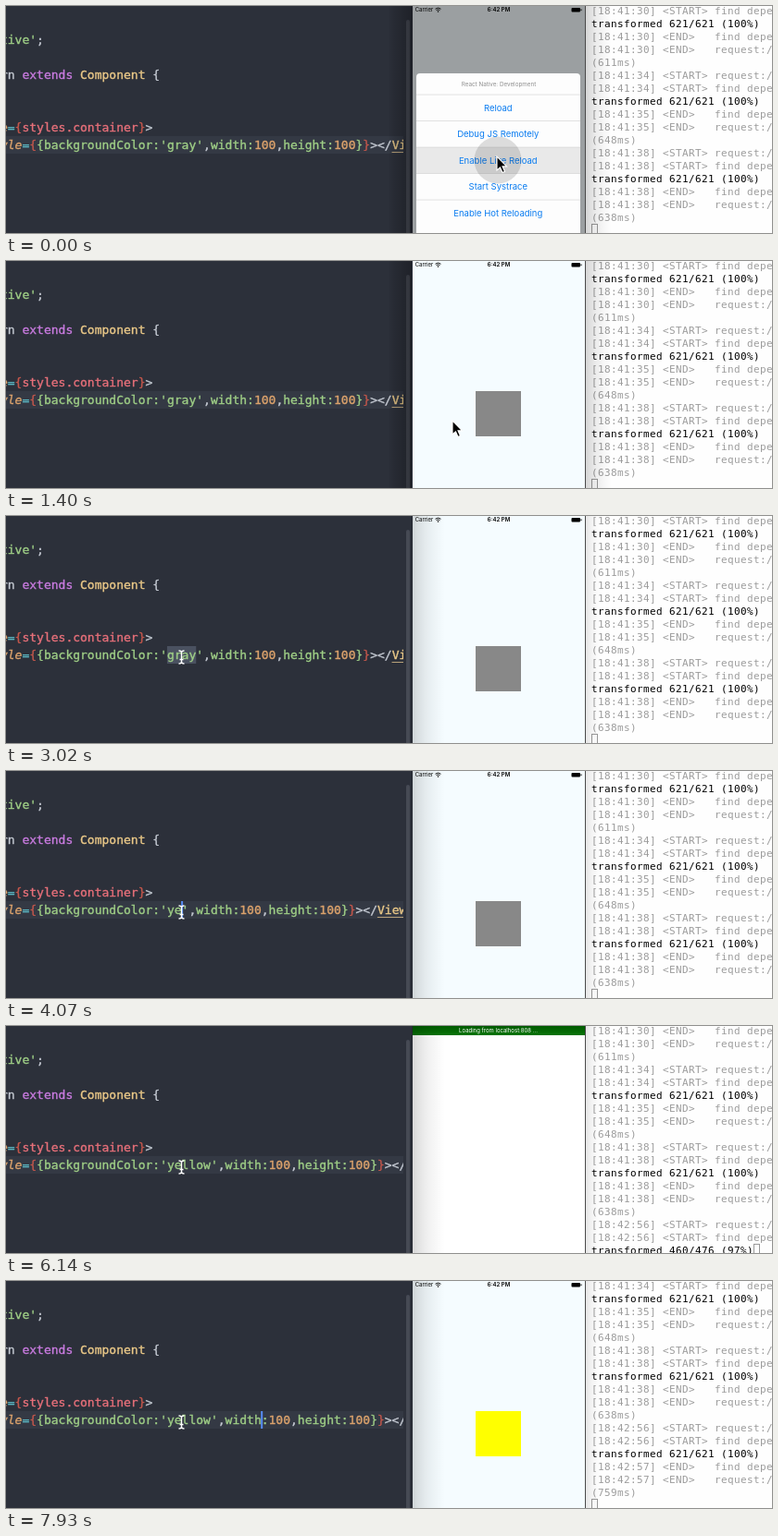
An HTML page that plays this animation: 827x246 px, repeating every 8000 ms.

```html
<!DOCTYPE html>
<html lang="en">
<head>
<meta charset="utf-8">
<title>Live reload</title>
<style>
  html, body { margin: 0; width: 100%; height: 100%; overflow: hidden; background: #fff; }
  svg { display: block; }
  text { white-space: pre; }
  .code { font: 13px "DejaVu Sans Mono", monospace; }
  .code tspan { stroke-width: .35px; }
  .log { font: 11px "DejaVu Sans Mono", monospace; letter-spacing: .378px; }
  .ui { font-family: Inter, "Liberation Sans", sans-serif; text-anchor: middle; }
</style>
</head>
<body>
<svg id="stage" width="827" height="246" viewBox="0 0 827 246">
  <defs>
    <linearGradient id="toLeft">
      <stop offset="0" stop-opacity="0"/><stop offset=".3" stop-opacity=".12"/><stop offset="1" stop-opacity=".3"/>
    </linearGradient>
    <linearGradient id="toRight">
      <stop offset="0" stop-opacity=".16"/><stop offset=".4" stop-opacity=".07"/>
      <stop offset=".75" stop-opacity=".025"/><stop offset="1" stop-opacity="0"/>
    </linearGradient>
    <linearGradient id="bar" x2="0" y2="1">
      <stop offset="0" stop-color="#005a00"/><stop offset="1" stop-color="#087408"/>
    </linearGradient>
  </defs>

  <rect width="439" height="246" fill="#2c303a"/>
  <rect id="activeLine" y="141" width="429" height="19" fill="#343944"/>
  <rect id="selection" y="141" height="19" fill="#4a5160"/>
  <svg id="editor" class="code" width="429" height="246">
    <text id="styleLine" y="155"></text>
    <rect id="underline" y="158" width="31.3" height="1" fill="#b9a27a"/>
  </svg>
  <rect id="caret" y="141" width="2" height="19" fill="#568cf5"/>
  <rect x="432" y="15" width="4" height="240" rx="2" fill="#464a54"/>

  <rect x="626" width="201" height="246" fill="#fefefe"/>
  <g id="log" class="log"></g>
  <rect id="block" y="236.5" width="6" height="12" fill="none" stroke="#999"/>

  <rect id="editorShade" x="412" width="26" height="246" fill="url(#toLeft)"/>
  <rect id="logShade" x="626" height="246" fill="url(#toRight)"/>

  <svg x="438" width="188" height="246" viewBox="438 0 188 246">
    <rect id="screen" x="439" width="187" height="246"/>
    <rect id="box" x="507" y="141" width="49" height="49"/>
    <g id="status" class="ui" font-size="6">
      <text x="451.5" y="6.3">Carrier</text>
      <text x="532" y="6.3" font-weight="600">6:42 PM</text>
      <path d="M463.5 3.2Q466.5 .8 469.5 3.2M464.6 4.6Q466.5 3 468.4 4.6" fill="none" stroke="#000" stroke-width=".9"/>
      <circle cx="466.5" cy="6" r=".8"/>
      <rect x="610.5" y="2" width="9.5" height="4.6" rx="1"/>
      <rect x="620.5" y="3.4" width="1" height="1.8"/>
    </g>
    <g id="loading" class="ui">
      <rect x="439" width="187" height="10" fill="url(#bar)"/>
      <text x="531.5" y="7" font-size="6" fill="#fff">Loading from localhost:808 ...</text>
    </g>
    <rect id="dim" x="438" width="188" height="246"/>
    <g id="sheet" class="ui">
      <rect x="443" y="73" width="177" height="200" rx="4" fill="#fdfdfd"/>
      <text x="532" y="87.3" font-size="6.3" fill="#8f8f8f">React Native: Development</text>
    </g>
    <rect id="simShade" x="438" width="36" height="246" fill="url(#toRight)"/>
    <rect x="625" width="1" height="246" fill="#4a4a4a"/>
  </svg>

  <circle id="touch" cx="531" cy="167" r="25.5" fill-opacity=".13"/>
  <path id="arrow" d="M0 0V15L3.5 11.8L6 17.5L8.5 16.4L6 10.9H10.6Z" stroke="#fff" stroke-width="1.1"/>
  <path id="beam" d="M-3-7Q0-7 0-5V5Q0 7-3 7M3-7Q0-7 0-5M3 7Q0 7 0 5M-2 2.5H2" fill="none" stroke="#fff" stroke-width="1.4"/>
</svg>

<script>
const LOOP = 8000, CELL = 7.826, LEFT = 1.77;
const $ = id => document.getElementById(id);
const set = (id, attrs) => { for (const k in attrs) $(id).setAttribute(k, attrs[k]); };
const show = (id, on) => { $(id).style.display = on ? '' : 'none'; };
const esc = s => s.replace(/</g, '&lt;');
const col = n => LEFT + n * CELL;

// Last entry whose time has been reached.
const at = (steps, t) => steps.reduce((cur, s) => s[0] <= t ? s : cur);

const C = { text: '#c5cad3', green: '#9fcf86', purple: '#c97be0', yellow: '#ebc988',
            red: '#e8707a', brace: '#c4574c', cyan: '#5cbac6', orange: '#dba26c' };

const spans = parts => parts.map(([color, s, extra = '']) =>
  `<tspan fill="${C[color]}" stroke="${C[color]}" ${extra}>${esc(s)}</tspan>`).join('');

function addCode(y, parts) {
  $('editor').insertAdjacentHTML('beforeend', `<text x="${col(-1)}" y="${y}">${spans(parts)}</text>`);
}
addCode(41, [['green', "tive'"], ['text', ';']]);
addCode(79, [['text', 'rn '], ['purple', 'extends '], ['yellow', 'Component '], ['text', '{']]);
addCode(136, [['orange', 'e', 'font-style="italic"'], ['cyan', '='], ['brace', '{'],
              ['red', 'styles.container'], ['brace', '}'], ['text', '>']]);

const styleParts = word => [
  ['orange', 'yle', 'font-style="italic"'], ['cyan', '='], ['brace', '{'], ['green', '{'],
  ['green', `backgroundColor:'${word}'`], ['text', ','],
  ['green', 'width:'], ['orange', '100'], ['text', ','],
  ['green', 'height:'], ['orange', '100'], ['green', '}'], ['brace', '}'],
  ['text', '></'], ['yellow', 'View']];
set('styleLine', { x: col(-1) });

const rows = ['Reload', 'Debug JS Remotely', 'Enable Live Reload', 'Start Systrace', 'Enable Hot Reloading'];
$('sheet').insertAdjacentHTML('beforeend', rows.map((label, i) => {
  const y = 96 + i * 28.5;
  return `<rect x="443" y="${y}" width="177" height="28.5" fill="${i === 2 ? '#e9e9e9' : 'none'}"/>
    <rect x="443" y="${y - .25}" width="177" height=".6" fill="#cfcfcf"/>
    <text x="531.3" y="${y + 17.6}" font-size="9.5" fill="#0a7cf0">${label}</text>`;
}).join(''));

const build = (start, end, ms) => [
  `[${start}] <START> request:/`, `[${start}] <START> find depe`,
  'transformed 621/621 (100%)',
  `[${end}] <END>   find depe`, `[${end}] <END>   request:/`, `(${ms}ms)`];
const log = [
  ...build('18:41:30', '18:41:30', 611), ...build('18:41:34', '18:41:35', 648),
  ...build('18:41:38', '18:41:38', 638), ...build('18:42:56', '18:42:57', 759)].slice(1);

const words = [[0, 'gray'], [3920, 'y'], [4070, 'ye'], [4510, 'yel'], [4660, 'yell'], [4810, 'yello'], [4960, 'yellow']];
const carets = [[0, -1], [1840, 46], [2280, -1], [2430, 24], [2570, -1],
  [3920, 23], [4070, 24], [4510, 25], [4660, 26], [4810, 27], [4960, 28],
  [5410, -1], [5700, 28], [6140, -1], [6590, 28], [7040, 29],
  [7490, 30], [7640, 31], [7780, 33], [7930, 35]];
const pointer = [[0, 530, 163], [1400, 482, 173], [1550, 392, 178], [1700, 292, 181],
  [1840, 236, 181], [1980, 225, 180], [2130, 214, 172], [2280, 191, 154, 'beam'], [2430, 189.5, 153, 'beam']];
const sheet = [[0, 0, .37], [500, 95, .18], [640, 200, 0]];
const app = [[0, '#f5fcff', '#888'], [5700, '#fff', 'none', 'bar'],
  [6440, '#f5fcff', '#ff0', 'bar'], [6590, '#f5fcff', '#ff0']];
const output = [[0, 17, ''], [5550, 18, ''], [5700, 19, 'transformed 67/118 (57%)'],
  [5850, 19, 'transformed 215/260 (83%)'], [5990, 19, 'transformed 371/392 (95%)'],
  [6140, 19, 'transformed 460/476 (97%)'], [6290, 19, 'transformed 588/598 (98%)'], [6440, 23, '']];

let lastWord, lastOutput;

function drawEditor(t) {
  const [, word] = at(words, t), [, caret] = at(carets, t);
  if (word !== lastWord) {
    $('styleLine').innerHTML = spans(styleParts(word));
    set('underline', { x: col(49 + word.length) });
    lastWord = word;
  }
  const selected = t >= 2870 && t < 3920;
  show('selection', selected);
  set('selection', { x: col(22), width: 4 * CELL });
  show('activeLine', !selected);
  show('caret', caret >= 0);
  set('caret', { x: col(caret) - .5 });
}

function drawLog(t) {
  const entry = at(output, t);
  if (entry === lastOutput) return;
  lastOutput = entry;
  const [, count, partial] = entry;
  $('log').innerHTML = [...log.slice(count - 17, count), partial].map((s, i) =>
    `<text x="632" y="${9 + i * 14}" fill="${s[0] === 't' ? '#000' : '#9c9c9c'}">${esc(s)}</text>`).join('');
  set('block', { x: 632.5 + partial.length * 7 });
}

function drawPhone(t) {
  const [, bg, fill, bar] = at(app, t), [, drop, dim] = at(sheet, t);
  set('screen', { fill: bg });
  set('box', { fill });
  show('status', !bar);
  show('loading', bar);
  set('sheet', { transform: `translate(0 ${drop})` });
  set('dim', { 'fill-opacity': dim });
  show('touch', t < 500);
  const phoneFront = t < 1840;
  show('editorShade', phoneFront);
  show('simShade', !phoneFront);
  set('logShade', { width: phoneFront ? 28 : 16, opacity: phoneFront ? 1.5 : .6 });
}

function drawPointer(t) {
  const [, x, y, kind = 'arrow'] = at(pointer, t);
  for (const id of ['arrow', 'beam']) show(id, id === kind);
  set(kind, { transform: `translate(${x} ${y})` });
}

function frame(now) {
  const t = now % LOOP;
  drawEditor(t);
  drawLog(t);
  drawPhone(t);
  drawPointer(t);
  requestAnimationFrame(frame);
}
const began = performance.now();
const tick = () => { const t = (performance.now() - began) % LOOP; drawEditor(t); drawLog(t); drawPhone(t); drawPointer(t); requestAnimationFrame(tick); };
tick();
</script>
</body>
</html>
```
